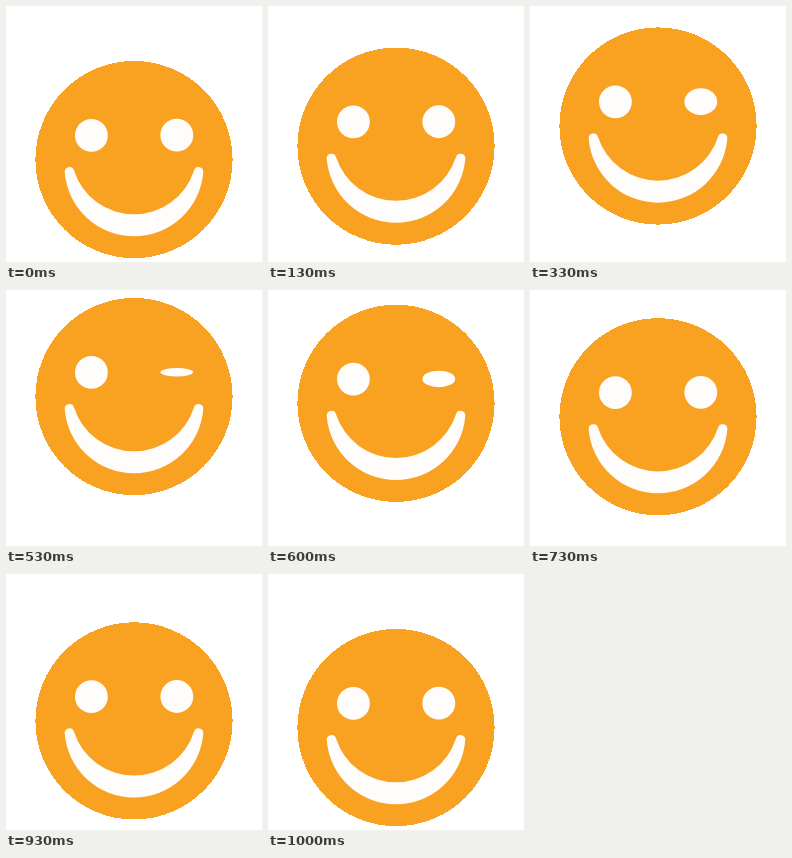
These frames come from a looping animation (256x256 px, 1060 ms). An HTML page:

```html
<!DOCTYPE html>
<html lang="en">
<head>
<meta charset="utf-8">
<title>Winking smiley</title>
<style>
  html, body { margin: 0; width: 100%; height: 100%; overflow: hidden; background: #fff; }
  svg { display: block; width: 100vw; height: 100vh; }
</style>
</head>
<body>
<svg viewBox="0 0 256 256">
  <g id="smiley" fill="#fffdfc">
    <circle cx="128" cy="153.6" r="98.6" fill="#f9a120" shape-rendering="crispEdges"/>
    <circle cx="85.4" cy="129.4" r="16.4"/>
    <ellipse id="wink" cx="170.8" cy="129.2" rx="16.4" ry="16.4"/>
    <path d="M58.7 166 A69.5 69.5 0 0 0 197.3 166 A4.75 4.75 0 0 0 188 164.5
             A63 63 0 0 1 68 164.5 A4.75 4.75 0 0 0 58.7 166 Z"/>
  </g>
</svg>
<script>
  const LOOP = 1060, STEPS = 16, RISE = 47;
  const OPEN = 16.4, SHUT = 4.2;
  const smiley = document.getElementById('smiley');
  const wink = document.getElementById('wink');

  const clamp = v => Math.min(1, Math.max(0, v));
  const ramp = (k, from, to) => clamp((k - from) / (to - from));

  // Fifteen steps per second, each start cut to whole hundredths.
  const starts = Array.from({ length: STEPS }, (_, k) => Math.floor(k * 20 / 3) * 10);

  function draw(time) {
    const t = time % LOOP;
    const k = starts.filter(s => s <= t).length - 1;
    const lift = RISE * (ramp(k, 0, 7) - ramp(k, 8, 15));
    const closed = ramp(k, 4, 8) - ramp(k, 8, 11);
    smiley.setAttribute('transform', `translate(0 ${-lift})`);
    wink.setAttribute('ry', OPEN + (SHUT - OPEN) * closed);
  }

  const begin = performance.now();
  function tick() {
    draw(performance.now() - begin);
    requestAnimationFrame(tick);
  }
  tick();
</script>
</body>
</html>
```
